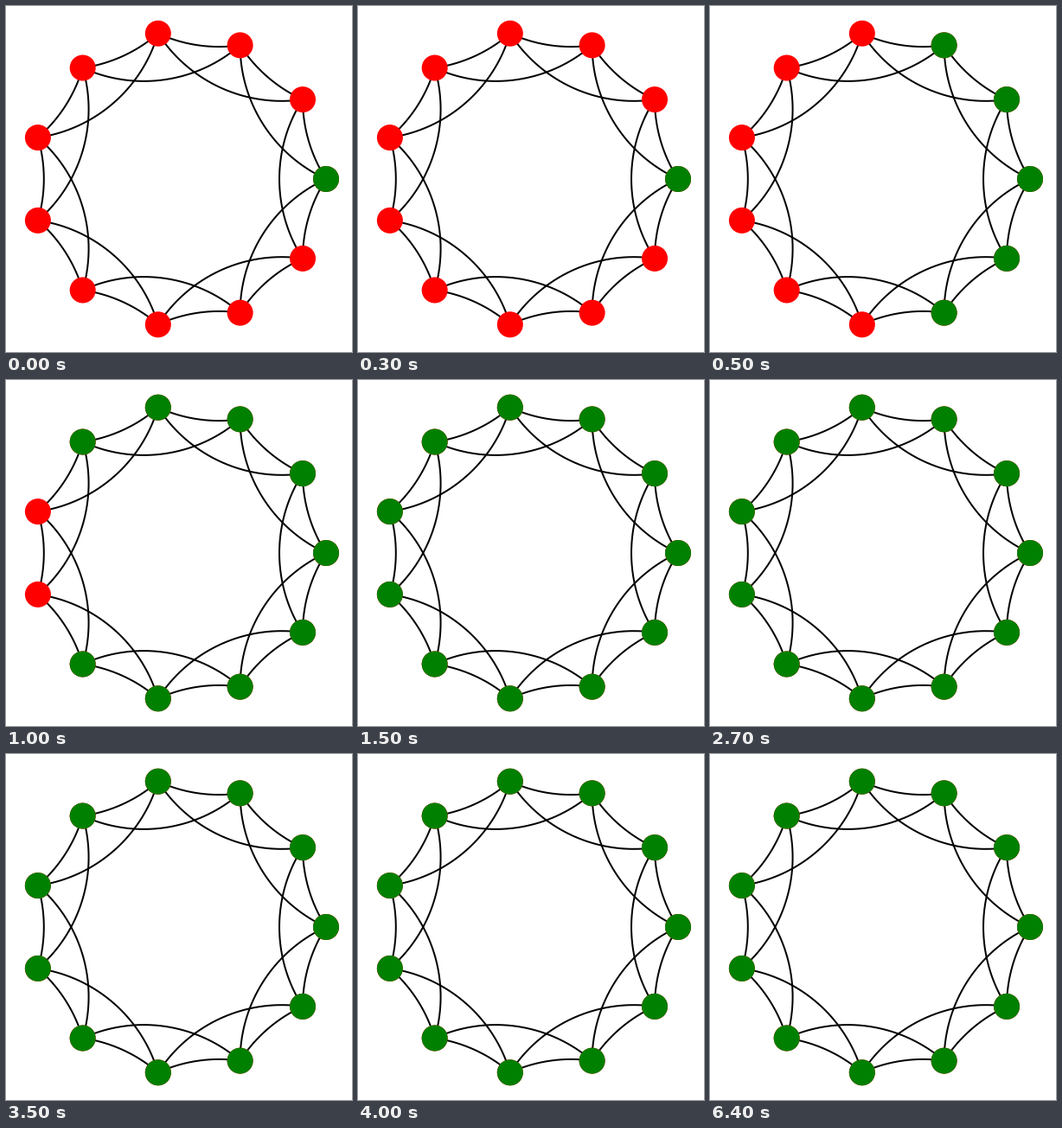
A matplotlib script for the animation above (8000 ms loop, 400 by 400 pixels).

```python
import numpy as np
import matplotlib.pyplot as plt
from matplotlib.animation import FuncAnimation
from matplotlib.patches import Circle

SIZE, DPI = 400, 100
NODES = 11
REACH = 2            # each node links to this many neighbours per side
CENTER = SIZE / 2
RING = 170
NODE_R = 15
STEP_MS, STEPS = 500, 16
PX = 72 / DPI        # points per pixel

fig = plt.figure(figsize=(SIZE / DPI, SIZE / DPI), dpi=DPI, facecolor="white")
ax = fig.add_axes([0, 0, 1, 1])
ax.set_xlim(0, SIZE)
ax.set_ylim(SIZE, 0)
ax.axis("off")


def polar(radius, angle):
    return CENTER + radius * np.cos(angle), CENTER - radius * np.sin(angle)


def draw_link(start, hop):
    """Ring arc between two nodes, mirrored inward across its chord."""
    half = np.pi * hop / NODES
    mid = 2 * np.pi * start / NODES + half
    cx, cy = polar(2 * RING * np.cos(half), mid)
    a = mid + np.pi + np.linspace(-half, half, 60)
    ax.plot(cx + RING * np.cos(a), cy - RING * np.sin(a),
            color="black", lw=2 * PX, zorder=1)


def add_node(k, color, zorder):
    dot = Circle(polar(RING, 2 * np.pi * k / NODES), NODE_R,
                 facecolor=color, linewidth=0, zorder=zorder)
    return ax.add_patch(dot)


for k in range(NODES):
    for hop in range(1, REACH + 1):
        draw_link(k, hop)

for k in range(NODES):
    add_node(k, "red", 2)
reached = [add_node(k, "green", 3) for k in range(NODES)]


def update(step):
    # the signal spreads REACH nodes both ways on every step
    for k, dot in enumerate(reached):
        dot.set_visible(min(k, NODES - k) <= REACH * step)
    return reached


anim = FuncAnimation(fig, update, frames=STEPS, interval=STEP_MS,
                     init_func=lambda: update(0), repeat=True, repeat_delay=0)
plt.show()
```
